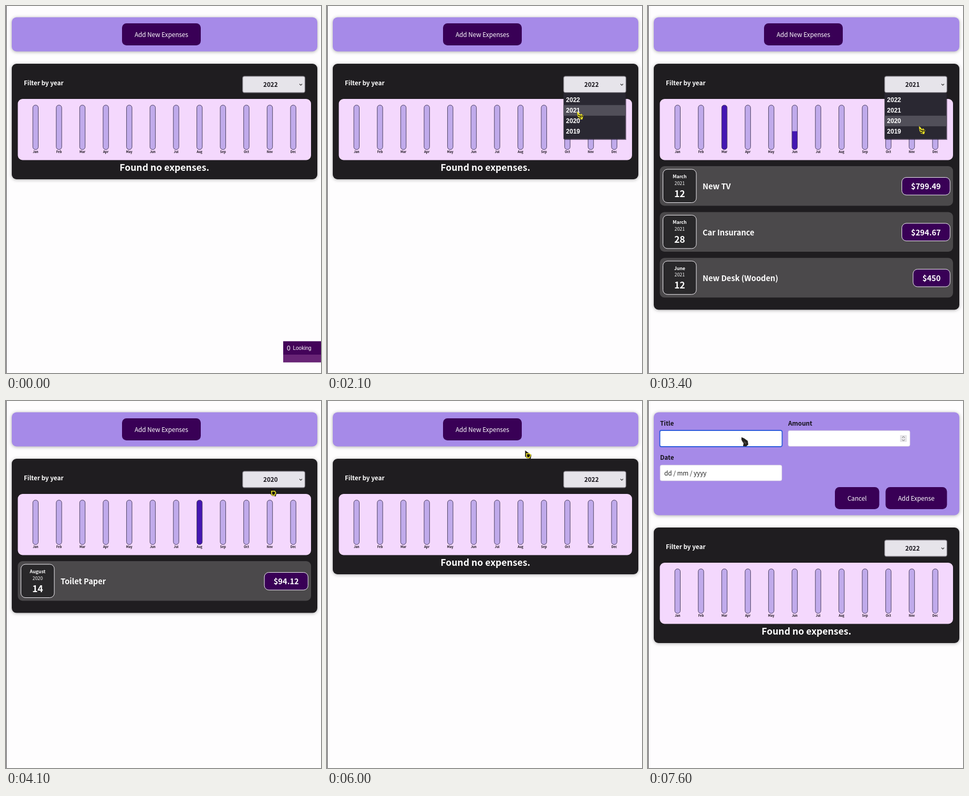
An HTML page that plays this animation: 600 px wide and 699 px high, repeating every 8000 ms.

```html
<!DOCTYPE html>
<html lang="en">
<head>
<meta charset="utf-8">
<title>Expenses</title>
<style>
  html, body { margin: 0; width: 100%; height: 100%; overflow: hidden; background: #fefdfe; }
  svg { display: block; width: 600px; height: 699px; }
  text { font-family: "Noto Sans CJK JP", "Noto Sans CJK SC", "Noto Sans CJK", "Noto Sans", sans-serif; }
  .ui { font-family: "Liberation Sans", Arial, sans-serif; }
  .card { filter: drop-shadow(0 1px 3px rgba(0, 0, 0, .32)); }
</style>
</head>
<body>
<svg id="stage" viewBox="0 0 600 699"></svg>
<script>
const LOOP = 8000;
const REM = 11.73;
const PLUM = '#390056';
const FORM_AT = 6800;
const MONTHS = 'Jan Feb Mar Apr May Jun Jul Aug Sep Oct Nov Dec'.split(' ');
const YEARS = [2022, 2021, 2020, 2019];

const expenses = {
  2022: [],
  2021: [
    { month: 'March', day: 12, title: 'New TV', price: '$799.49' },
    { month: 'March', day: 28, title: 'Car Insurance', price: '$294.67' },
    { month: 'June', day: 12, title: 'New Desk (Wooden)', price: '$450' }
  ],
  2020: [{ month: 'August', day: 14, title: 'Toilet Paper', price: '$94.12' }]
};

// [time, selected year]
const picks = [[0, 2022], [2300, 2021], [3600, 2020], [5500, 2022]];
// [open, close] of the year menu
const menus = [[1500, 2300], [2900, 3600], [4700, 5500]];
// [time, x, y] of the pointer tip
const route = [
  [200, 225, 130], [500, 300, 60], [700, 330, 66], [1200, 464, 145], [1500, 464, 145],
  [2000, 476, 201], [2300, 477, 202], [2800, 500, 150], [3000, 502, 152], [3400, 516, 229],
  [3600, 517, 222], [4300, 500, 152], [4800, 500, 152], [5200, 499, 184], [5500, 498, 180],
  [6300, 322, 55], [6850, 322, 54], [7200, 178, 69]
];

const stage = document.getElementById('stage');
const clamp = v => Math.max(0, Math.min(1, v));
const mix = (a, b, k) => a + (b - a) * k;
const easeOut = k => 1 - (1 - k) ** 2.2;
const smooth = k => k * k * (3 - 2 * k);

const rect = (x, y, w, h, r, fill, more = '') =>
  `<rect x="${x}" y="${y}" width="${w}" height="${h}" rx="${r}" fill="${fill}" ${more}/>`;
const path = (d, fill, more = '') => `<path d="${d}" fill="${fill}" ${more}/>`;
const text = (s, x, y, size, fill, weight = 400, anchor = 'start', more = '') =>
  `<text x="${x}" y="${y}" font-size="${size}" fill="${fill}" font-weight="${weight}" text-anchor="${anchor}" ${more}>${s}</text>`;
const bold = (s, x, y, size, fill, anchor) => text(s, x, y, size, fill, 700, anchor);

const button = (label, x, y, w, fill = PLUM) =>
  rect(x, y, w, 42, 8.5, fill) + text(label, x + w / 2, y + 26, REM, '#fff', 500, 'middle');

function pointerAt(t) {
  if (t < route[0][0]) return null;
  const i = route.findIndex(p => p[0] > t);
  if (i < 0) return route[route.length - 1].slice(1);
  const [a, b] = [route[i - 1], route[i]];
  const k = smooth((t - a[0]) / (b[0] - a[0]));
  return [mix(a[1], b[1], k), mix(a[2], b[2], k)];
}

function pointer([x, y], kind) {
  const shapes = {
    arrow: path('M0 0L12 8.5 10.5 16 3 14.5 0 11Z', '#1c1810') +
      path('M2.5 6H8.5L10.5 9 8 14 3 13Z', '#1c1810', 'stroke="#f4ea2a" stroke-width="1.6"'),
    hand: path('M0 0L3 2 6 6 8 4 12 8 10 15 4 14 1 8Z', '#f2e829') +
      path('M2 6L5 9M6 7L8 11M3 11L7 13M9 7L11 10', 'none', 'stroke="#1c1810" stroke-width="1.7"'),
    dark: path('M0 0L5 2 12 7 13 14 9 17.5 3 17 4 12 0 5Z', '#24221f') +
      path('M5 8V12M8 9V13', 'none', 'stroke="#8d887a" stroke-width=".8"')
  };
  return `<g transform="translate(${x} ${y})">${shapes[kind]}</g>`;
}

const overButton = ([x, y]) => x > 221 && x < 371 && y > 33 && y < 75;

function header(hover) {
  return rect(11, 21.5, 582, 65, 9, '#a68ae8', 'class="card"') +
    button('Add New Expenses', 221, 33, 150, hover ? '#4a036c' : PLUM);
}

function form(t) {
  const input = (x, y) => rect(x, y, 232, 30, 3, '#fff', 'stroke="#cdc5dc" stroke-width=".8"');
  const caret = t < 7600 ? rect(28.5, 64, 1, 15, 0, '#111') : '';
  return rect(11, 21.5, 582, 196, 9, '#a68ae8', 'class="card"') +
    bold('Title', 23, 46.5, REM, '#141118') +
    bold('Amount', 267, 46.5, REM, '#141118') +
    bold('Date', 23, 112, REM, '#141118') +
    rect(22.5, 56, 233, 31, 3, '#fff', 'stroke="#2d5bdc" stroke-width="1.8"') + caret +
    input(267, 56.3) + input(23, 122) +
    rect(480, 65, 13, 13, 1, '#e6e5e8') +
    path('M484 70l2.5-2.5 2.5 2.5M484 73.5l2.5 2.5 2.5-2.5', 'none', 'stroke="#666" stroke-width="1"') +
    text('dd / mm / yyyy', 31, 142, REM, '#222') +
    button('Cancel', 356, 164, 84.5) + button('Add Expense', 452.5, 164, 117);
}

function shares(year) {
  const sums = MONTHS.map(m => expenses[year]
    .filter(e => e.month.startsWith(m))
    .reduce((sum, e) => sum + +e.price.slice(1), 0));
  const top = Math.max(...sums) || 1;
  return sums.map(s => s / top);
}

function chart(t, step) {
  const now = shares(picks[step][1]);
  const before = shares(picks[Math.max(0, step - 1)][1]);
  const k = easeOut(clamp((t - picks[step][0]) / 300));
  const bars = MONTHS.map((m, i) => {
    const mid = 56.3 + i * 44.62;
    const share = mix(before[i], now[i], k);
    const bar = (fill, more) => rect(mid - 5.2, 188.8, 10.4, 84.6, 5, fill, more);
    return bar('#c0aaeb') +
      (share > .002 ? bar('#4416b2', `style="clip-path: inset(${(1 - share) * 100}% 0 0 0)"`) : '') +
      bar('none', 'stroke="#3d3350" stroke-width=".9"') +
      bold(m, mid, 280.3, REM / 2, '#161018', 'middle');
  });
  return rect(22.5, 177, 558.5, 116.5, 9, '#f4d8fd') + bars.join('');
}

function expense(e, year, i) {
  const y = 305 + i * 87.4;
  const digits = e.price.replace('.', '').length;
  const w = 36 + digits * 8.6 + (e.price.includes('.') ? 4.2 : 0);
  const edge = 'stroke="#f4f1f6" stroke-width="1"';
  return rect(22.5, y, 558.5, 75.5, 9, '#4b494b') +
    rect(28.5, y + 6, 63.5, 63.5, 8.5, '#29282a', edge) +
    bold(e.month, 60.3, y + 23, REM * .75, '#fff', 'middle') +
    text(year, 60.3, y + 35.5, REM * .75, '#fff', 400, 'middle') +
    bold(e.day, 60.3, y + 58.5, REM * 1.5, '#fff', 'middle') +
    bold(e.title, 104, y + 44.3, REM * 1.25, '#fff') +
    rect(575.3 - w, y + 21.5, w, 33.5, 8.5, PLUM, edge) +
    bold(e.price, 575.3 - w / 2, y + 44.3, REM * 1.25, '#fff', 'middle');
}

function menu(tip) {
  const hovered = Math.max(0, Math.min(2, Math.floor((tip[1] - 168.5) / 20.2)));
  return rect(452, 167, 118, 88, 0, 'rgba(40,30,50,.55)') +
    rect(450.5, 165.5, 118, 88, 0, '#2a2832') +
    rect(450.5, 168.5 + hovered * 20.2, 118, 20.2, 0, '#514f59') +
    YEARS.map((y, i) => text(y, 455.3, 182.8 + i * 20.2, 12, '#fff', 700, 'start', 'class="ui"')).join('');
}

function panel(t, tip) {
  const step = picks.filter(p => p[0] <= t).length - 1;
  const year = picks[step][1];
  const list = expenses[year];
  const height = list.length ? 206.2 + 87.4 * list.length : 220;
  const open = menus.some(([a, b]) => t >= a && t < b);
  return rect(11, 110, 582, height, 9, '#1f1d20', 'class="card"') +
    bold('Filter by year', 34, 151, REM, '#fff') +
    rect(450.7, 133.8, 118.8, 31.2, 3.5, '#e6e4ea', 'stroke="#77737b" stroke-width="1.3"') +
    bold(year, 503.8, 154.3, REM, '#141118', 'middle') +
    path('M559 148.5l2.5 2.5 2.5-2.5', 'none', 'stroke="#333" stroke-width="1.2"') +
    chart(t, step) +
    (list.length
      ? list.map((e, i) => expense(e, year, i)).join('')
      : bold('Found no expenses.', 301.7, 313.5, REM * 1.5, '#fff', 'middle')) +
    (open ? menu(tip) : '');
}

function badge(t) {
  if (t >= 1950) return '';
  const looking = t < 700;
  const [x, y, h, label] = looking ? [528, 638.5, 40, 'Looking'] : [533, 647, 32, 'Trackers'];
  return rect(x, y, 600 - x, h, 0, looking ? '#430359' : '#480760') +
    (looking ? rect(x, 664, 72, 14.5, 0, '#682476') : rect(x + 2, 668, 65, 9.5, 0, '#632070')) +
    text(0, x + 7, y + 17, 12, '#fff', 400, 'start', 'class="ui"') +
    text(label, x + 18.5, y + 16.8, 10, '#fff', 400, 'start', 'class="ui"');
}

function pointerKind(t, tip) {
  if (t >= 7000) return 'dark';
  const inMenu = menus.some(([a, b]) => t >= a && t < b) && tip[1] > 166;
  return inMenu || overButton(tip) ? 'hand' : 'arrow';
}

function render(t) {
  const tip = pointerAt(t);
  const editing = t >= FORM_AT;
  stage.innerHTML = rect(0, 0, 600, 699, 0, '#fefdfe') + rect(0, 0, 1, 699, 0, '#3a383b') +
    (editing ? form(t) : header(tip && overButton(tip))) +
    `<g transform="translate(0 ${editing ? 131 : 0})">${panel(t, tip)}</g>` +
    badge(t) + (tip ? pointer(tip, pointerKind(t, tip)) : '');
}

const start = performance.now();
function tick() {
  render((performance.now() - start) % LOOP);
  requestAnimationFrame(tick);
}
tick();
</script>
</body>
</html>
```
